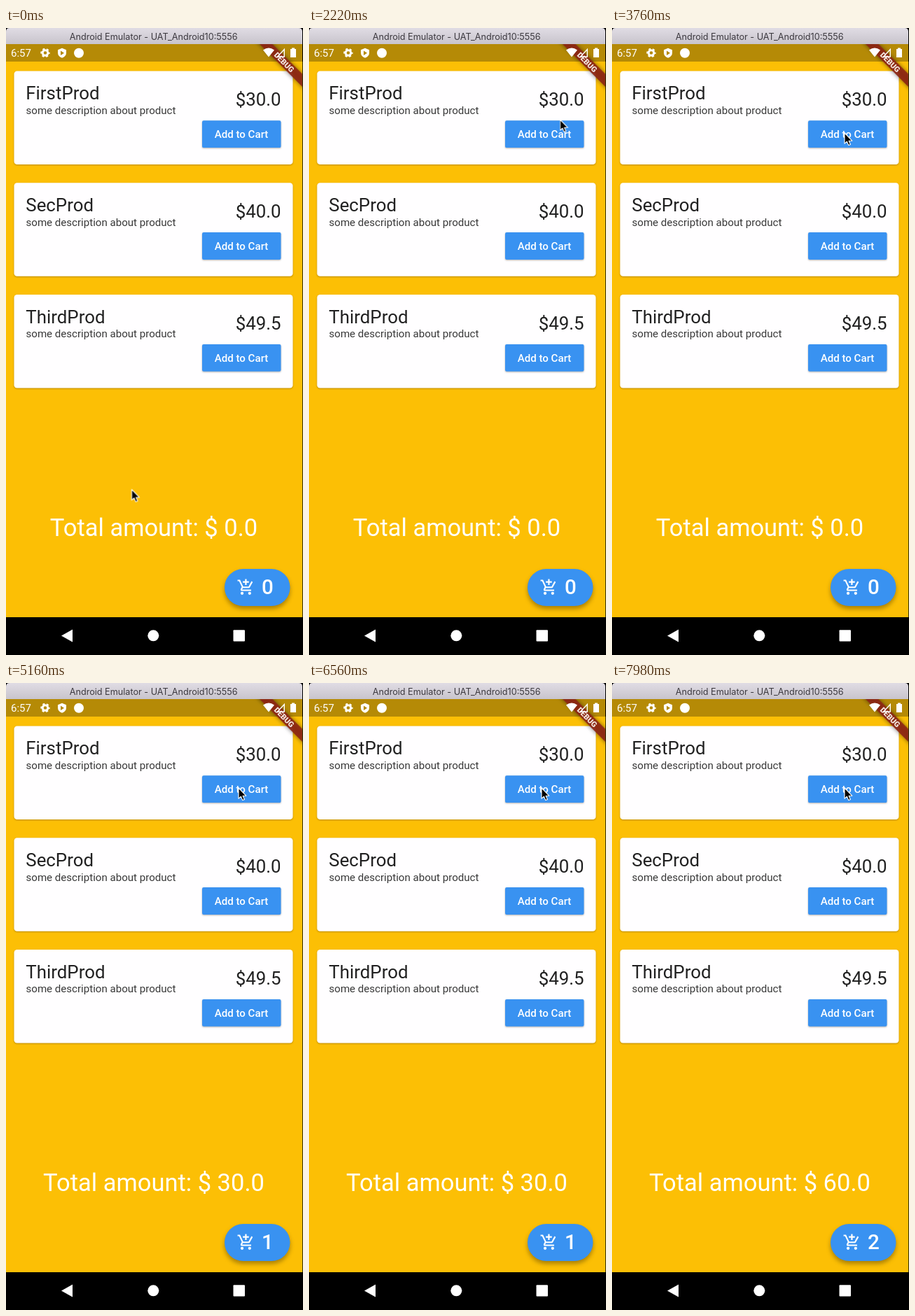
These frames come from a looping animation (424 px wide and 896 px high, 8 s). An HTML page:

```html
<!DOCTYPE html>
<html lang="en">
<head>
<meta charset="utf-8">
<title>Cart demo</title>
<style>
  html, body { margin: 0; width: 100%; height: 100%; overflow: hidden; background: #000; }
  svg { display: block; width: 424px; height: 896px; }
  text { font-family: Roboto, sans-serif; }
  .window-title { font: 12.65px Inter, sans-serif; fill: #3d3a40; text-anchor: middle; }
  .clock { font-size: 15px; }
  .name, .price { font-size: 25.85px; fill: #212121; }
  .price { text-anchor: end; }
  .about { font-size: 15.08px; fill: #383838; }
  .action { font-size: 15.08px; font-weight: 500; fill: #fff; text-anchor: middle; }
  .total { font-size: 34.5px; fill: #fff; text-anchor: middle; }
  .count { font-size: 29.6px; font-weight: 500; fill: #fff; text-anchor: middle; }
  .banner { font-size: 10.2px; font-weight: 900; fill: #f4e8e2; text-anchor: middle; }
  .card { filter: drop-shadow(0 1px 1px rgba(90, 60, 0, .4)); }
  .button { fill: #3992f1; filter: drop-shadow(0 1.5px 1px rgba(60, 60, 60, .4)); }
  .fab { fill: #3992f1; filter: drop-shadow(0 4px 3px rgba(70, 50, 0, .45)); }
  .ribbon { filter: drop-shadow(0 0 3px rgba(0, 0, 0, .55)); }

  .cursor { animation: point 8s linear infinite; }
  .state { visibility: hidden; animation: 8s step-end infinite; }
  .empty { animation-name: empty; }
  .one { animation-name: one; }
  .two { animation-name: two; }

  @keyframes point {
    0%, 9.75% { transform: translate(179.5px, 659.5px); animation-timing-function: ease-in; }
    12.5% { transform: translate(236px, 503.5px); }
    19.5% { transform: translate(350px, 158px); animation-timing-function: ease-out; }
    27.75%, 31.5% { transform: translate(358.5px, 131px); animation-timing-function: ease-in-out; }
    40.5%, 100% { transform: translate(332px, 150px); }
  }
  @keyframes empty { 0% { visibility: visible; } 56.75%, 100% { visibility: hidden; } }
  @keyframes one { 0% { visibility: hidden; } 56.75% { visibility: visible; } 88.5%, 100% { visibility: hidden; } }
  @keyframes two { 0% { visibility: hidden; } 88.5%, 100% { visibility: visible; } }
</style>
</head>
<body>
<svg viewBox="0 0 424 896">
  <defs>
    <linearGradient id="chrome" x2="0" y2="1">
      <stop stop-color="#e0dce4"/>
      <stop offset="1" stop-color="#c8c4cc"/>
    </linearGradient>
    <clipPath id="screen"><rect y="23" width="423" height="819"/></clipPath>
    <g id="product">
      <rect class="card" x="11.5" y="61.5" width="398" height="133.5" rx="4.3" fill="#fffeff"/>
      <text class="about" x="28.5" y="122.8">some description about product</text>
      <rect class="button" x="280" y="132.3" width="112.5" height="38.8" rx="2.2"/>
      <text class="action" x="336" y="157.3">Add to Cart</text>
    </g>
  </defs>

  <rect width="424" height="896"/>
  <path d="M0 23V5Q0 0 5 0H418Q423 0 423 5V23Z" fill="url(#chrome)"/>
  <text class="window-title" x="210.7" y="17">Android Emulator - UAT_Android10:5556</text>

  <rect y="23" width="423" height="819" fill="#fcbf05"/>
  <rect y="23" width="423" height="25" fill="#b58a06"/>
  <rect x="423" y="48" width="1" height="794" fill="#34320a"/>

  <use href="#product"/>
  <text class="name" x="28.3" y="102.3">FirstProd</text>
  <text class="price" x="392.6" y="111">$30.0</text>
  <use href="#product" y="159.8"/>
  <text class="name" x="28.3" y="262.2">SecProd</text>
  <text class="price" x="392.6" y="270.8">$40.0</text>
  <use href="#product" y="319.6"/>
  <text class="name" x="28.3" y="422">ThirdProd</text>
  <text class="price" x="392.6" y="430.6">$49.5</text>

  <rect class="fab" x="312" y="773" width="93.5" height="53" rx="26.5"/>
  <path transform="translate(329.5 786.3) scale(1.077)" fill="#fff" d="M11 9h2V6h3V4h-3V1h-2v3H8v2h3zM7 18a2 2 0 1 0 0 4 2 2 0 0 0 0-4zm10 0a2 2 0 1 0 0 4 2 2 0 0 0 0-4zm-9.83-3.25l.03-.12.9-1.63h7.45c.75 0 1.41-.41 1.75-1.03l3.86-7.01L19.42 4h-.01l-3.86 7H8.53L4.27 2H1v2h2l3.6 7.59-1.35 2.45C4.5 15.4 5.5 17 7 17h12v-2H7.42c-.13 0-.25-.11-.25-.25z"/>

  <g class="state empty">
    <text class="total" x="211" y="726.3">Total amount: $ 0.0</text>
    <text class="count" x="373.3" y="809.4">0</text>
  </g>
  <g class="state one">
    <text class="total" x="211" y="726.3">Total amount: $ 30.0</text>
    <text class="count" x="373.3" y="809.4">1</text>
  </g>
  <g class="state two">
    <text class="total" x="211" y="726.3">Total amount: $ 60.0</text>
    <text class="count" x="373.3" y="809.4">2</text>
  </g>

  <g clip-path="url(#screen)">
    <g transform="translate(423 23) rotate(45) scale(1.077)">
      <rect class="ribbon" x="-60" y="28" width="120" height="12" fill="#8f2614" fill-opacity=".92"/>
      <text class="banner" y="37.7">DEBUG</text>
    </g>
  </g>

  <g fill="#fff">
    <text class="clock" x="7" y="41">6:57</text>
    <g fill="none" stroke="#fff">
      <circle cx="56" cy="35.5" r="3.8" stroke-width="3"/>
      <circle cx="56" cy="35.5" r="5.6" stroke-width="2.2" stroke-dasharray="2.93" stroke-dashoffset="1.47"/>
      <path d="M387.5 41L397.3 30.5V41Z" stroke-width="1.4"/>
    </g>
    <path d="M80 28.8L86 31.2V35.5Q86 40.5 80 42.8Q74 40.5 74 35.5V31.2Z"/>
    <path d="M78 32.5V39L83 35.8Z" fill="#b58a06"/>
    <circle cx="104" cy="35.8" r="7"/>
    <path d="M367 31.5Q375 25.5 383 31.5L375 41.5Z"/>
    <path d="M406 30H408V28.5H412V30H414V42H406Z"/>
    <path d="M79 868.5L95 859.5V877.5Z"/>
    <circle cx="210.3" cy="868.3" r="8"/>
    <rect x="324.5" y="860.3" width="16.5" height="16.3" rx="1"/>
  </g>

  <g class="cursor">
    <path d="M0 0V15.2L3.4 12.2L5.8 17.6L8.4 16.5L6.1 11.2H10.8Z" stroke="#fff" stroke-width="1.1" stroke-linejoin="round"/>
  </g>
</svg>
</body>
</html>
```
